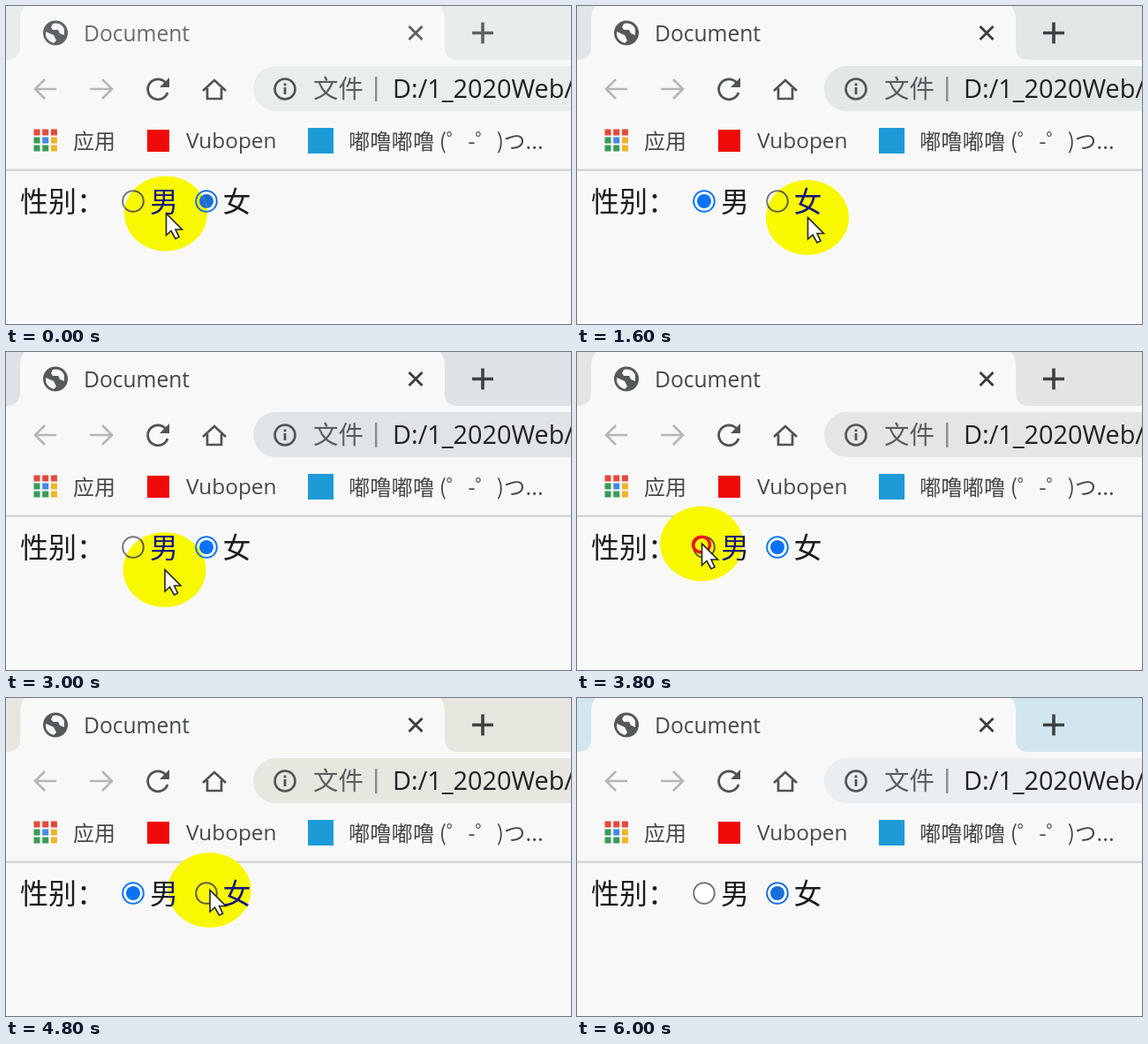
Recreate the animation shown at these times as an HTML page with a canvas. Size 640 by 360 pixels, loop 6200 ms.

```html
<!DOCTYPE html>
<html lang="zh-CN">
<head>
<meta charset="utf-8">
<title>Radio labels</title>
<style>
html, body { margin: 0; width: 100%; height: 100%; overflow: hidden; background: #f8f8f8; }
canvas { display: block; }
</style>
</head>
<body>
<canvas id="stage" width="640" height="360"></canvas>
<script>
const ctx = document.getElementById('stage').getContext('2d');
const LOOP = 6200, STEP = 200, PAPER = '#f8f8f8';
const LATIN = '"Open Sans", "Noto Sans", sans-serif';
const CJK = '"Noto Sans CJK SC", "Noto Sans CJK", sans-serif';

// Pointer waypoints: time, x, y
const route = [
  [0, 181, 235], [1000, 181, 235], [1600, 261, 239.5], [2200, 261, 239.5],
  [3000, 179.5, 246.5], [3600, 141, 217], [4000, 141, 217],
  [4800, 230.5, 217.5], [5200, 230.5, 217.5], [5600, 250, 410], [LOOP, 250, 410]
];
// Press time -> ring radius
const presses = { 800: 8, 1800: 8.5, 3800: 9.5, 5000: 9 };
// Start time, tab strip colour, address field colour
const tints = [
  [0, '#e7ecec', '#e8eeee'], [1000, '#e1e6e7', '#e2e7e8'], [2400, '#dee2e6', '#e1e4e7'],
  [3400, '#e4e4e2', '#e5e5e3'], [4400, '#e6e6de', '#e7e7e0'], [5600, '#d2e6ef', '#ebeef1']
];

function text(str, x, y, size, color, family = CJK) {
  ctx.font = `${size}px ${family}`;
  ctx.fillStyle = color;
  ctx.fillText(str, x, y);
}

function shape(d, { fill, stroke, width = 2.7, x = 0, y = 0 }) {
  const path = new Path2D(d);
  ctx.save();
  ctx.translate(x, y);
  if (fill) { ctx.fillStyle = fill; ctx.fill(path); }
  if (stroke) { ctx.strokeStyle = stroke; ctx.lineWidth = width; ctx.stroke(path); }
  ctx.restore();
}

function oval(x, y, rx, ry, { fill, stroke, width = 2 }) {
  ctx.beginPath();
  ctx.ellipse(x, y, rx, ry, 0, 0, Math.PI * 2);
  if (fill) { ctx.fillStyle = fill; ctx.fill(); }
  if (stroke) { ctx.strokeStyle = stroke; ctx.lineWidth = width; ctx.stroke(); }
}

function box(x, y, w, h, color) {
  ctx.fillStyle = color;
  ctx.fillRect(x, y, w, h);
}

function drawTabs(strip, focused) {
  const ink = focused ? '#3c4043' : '#5f6265';
  box(0, 0, 640, 61, strip);
  shape('M0 61Q16 61 16 46V15Q16 3 25 -3H488Q497 3 497 15V46Q497 61 512 61Z', { fill: PAPER });
  oval(56, 30.5, 14, 14, { fill: focused ? '#55595c' : '#5f6368' });
  shape('M45 29L54 33L57 39L54 42Q44 39 45 29ZM53 20Q62 18 66 26L66 33L61 31L59 27L53 27L51 24Z', { fill: PAPER });
  text('Document', 88, 39.5, 24.6, focused ? '#45484b' : '#696c6f', LATIN);
  shape('M456.500 23L471.500 38M471.500 23L456.500 38', { stroke: ink, width: 3 });
  shape('M528 30.500H552M540 18.500V42.500', { stroke: ink, width: 3.6 });
}

function drawToolbar(field) {
  const ink = '#505356', pale = '#b4b6b8';
  shape('M57 0H33M44 -11L33 0L44 11', { stroke: pale, y: 94 });
  shape('M95 0H120M109 -11L120 0L109 11', { stroke: pale, y: 94 });
  shape('M181 87A11.500 11.500 0 1 0 183 98', { stroke: ink, width: 2.8 });
  shape('M185 81V92H174Z', { fill: ink });
  shape('M223 96L236 84L249 96M228 93V105H244V93', { stroke: ink });

  ctx.beginPath();
  ctx.roundRect(280, 68, 400, 51, 25.5);
  ctx.fillStyle = field;
  ctx.fill();
  oval(316, 94, 11.5, 11.5, { stroke: ink, width: 2.6 });
  box(314.6, 92, 2.8, 8, ink);
  box(314.6, 87.5, 2.8, 2.8, ink);
  text('文件', 348, 104, 28.4, '#5a5d60');
  box(418, 80, 2.4, 28, '#8a8c8f');
  text('D:/1_2020Web/', 438, 104, 28.8, '#202124', LATIN);
}

function drawBookmarks() {
  const red = '#e24a3b', green = '#3a9b58', blue = '#4588e8', amber = '#f0b429';
  [red, red, red, green, blue, amber, green, green, amber].forEach((color, i) =>
    box(31.5 + i % 3 * 9.7, 139.5 + Math.floor(i / 3) * 9, 7, 7, color));
  text('应用', 76, 161.5, 24, '#45484b');
  box(160, 140, 25, 25, '#f00a0a');
  text('Vubopen', 204, 161, 24.4, '#45484b', LATIN);
  box(342, 138, 29, 29, '#1d9bd7');
  text('嘟噜嘟噜 (゜-゜)つ...', 388, 161.5, 24.3, '#45484b');
  box(0, 184.5, 640, 2.5, '#d3d6d8');
}

function drawRadio(x, checked, blue, paper, rim) {
  oval(x, 221, 11.8, 11.8, { fill: paper, stroke: checked ? blue : rim });
  if (checked) oval(x, 221, 8, 8, { fill: blue });
}

function drawForm(male, blue, ink, paper, rim) {
  text('性别：', 16, 233, 32, ink);
  drawRadio(144, male, blue, paper, rim);
  text('男', 163, 233, 32, ink);
  drawRadio(227, !male, blue, paper, rim);
  text('女', 245.5, 233, 32, ink);
}

function pointerAt(t) {
  const i = route.findIndex(point => point[0] > t);
  const [t0, x0, y0] = route[i - 1], [t1, x1, y1] = route[i];
  const p = (t - t0) / (t1 - t0), eased = p * p * (3 - 2 * p);
  return [x0 + (x1 - x0) * eased, y0 + (y1 - y0) * eased];
}

function drawPointer(x, y, ring, form) {
  ctx.save();
  oval(x, y, 47, 42.5, { fill: '#f8f800' });
  ctx.clip();
  form('#17177c', '#f8f800', '#5c5c48');
  ctx.restore();
  if (ring) oval(x, y + 1, ring, ring * 0.93, { stroke: '#f0141e', width: 3.5 });
  shape('M0.500 0V24.500L6 19.500L11 28.500L15 26.500L11 18H18.500Z', { fill: '#fff', stroke: '#222', width: 1.6, x, y });
}

function draw(now) {
  const t = Math.floor(now % LOOP / STEP) * STEP;
  const [, strip, field] = tints.findLast(tint => tint[0] <= t);
  const focused = t >= 1000;
  const male = (t >= 1000 && t < 2000) || (t >= 4000 && t < 5200);
  const blue = focused && t < 5600 ? '#0a73f5' : '#1a6dd8';
  const form = (ink, paper, rim) => drawForm(male, blue, ink, paper, rim);

  box(0, 0, 640, 360, PAPER);
  drawTabs(strip, focused);
  drawToolbar(field);
  drawBookmarks();
  form('#1c1c1c', '#fff', '#767676');
  drawPointer(...pointerAt(t), presses[t], form);
}

const start = performance.now();
(function tick() {
  draw(performance.now() - start);
  requestAnimationFrame(tick);
})();
</script>
</body>
</html>
```
